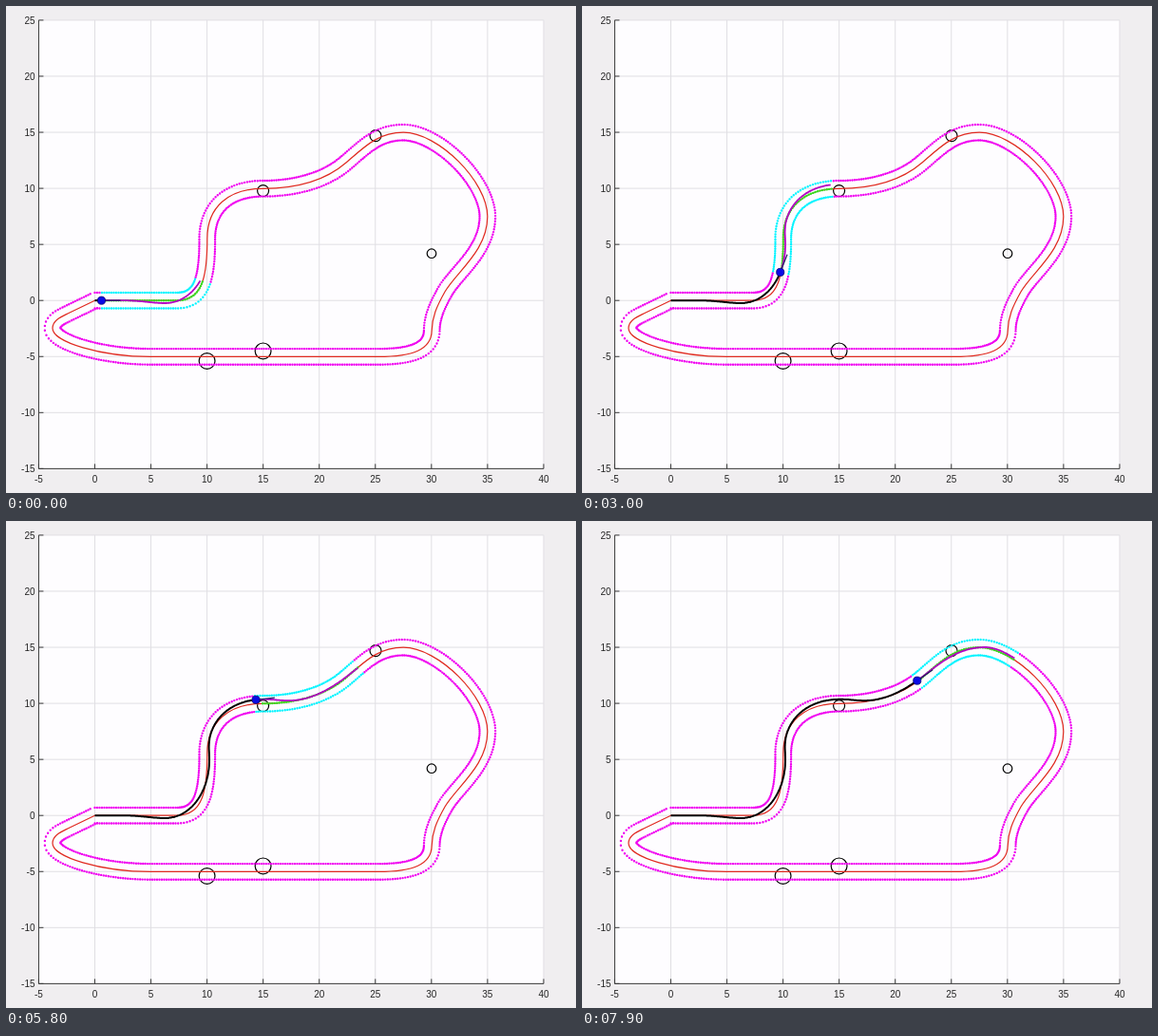
Animation, 600 px wide and 513 px high, one loop 8000 ms. Source, as an HTML page:

```html
<!DOCTYPE html>
<html lang="en">
<head>
<meta charset="utf-8">
<title>Track simulation</title>
<style>
  html, body { margin: 0; width: 100%; height: 100%; overflow: hidden; background: #f0eef0; }
  svg { display: block; width: 600px; height: 513px; }
  text { font: 10px "Liberation Sans", Arial, sans-serif; fill: #262626; }
  path, circle { fill: none; }
  .dots { stroke-linecap: round; stroke-width: 2.4; }
</style>
</head>
<body>
<svg id="plot" viewBox="0 0 600 513"></svg>
<script>
const LOOP = 8000, STEP = 100, SCALE = 11.811, HALF_WIDTH = 8.3;
const plot = document.getElementById('plot');
const px = x => 93.5 + x * SCALE;
const py = y => 310.2 - y * SCALE;

function add(tag, attrs, text) {
  const el = document.createElementNS('http://www.w3.org/2000/svg', tag);
  for (const k in attrs) el.setAttribute(k, attrs[k]);
  if (text !== undefined) el.textContent = text;
  plot.appendChild(el);
  return el;
}
const stroke = (color, width, d = '') =>
  add('path', { d, stroke: color, 'stroke-width': width, 'stroke-linejoin': 'round' });
const dotted = color => add('path', { class: 'dots', stroke: color });

// Axes
const [left, right, top_, bottom] = [px(-5), px(40), py(25), py(-15)];
add('rect', { x: left, y: top_, width: right - left, height: bottom - top_, fill: '#fefdff' });
let grid = '', ticks = `M${left} ${top_}V${bottom}H${right}`;
for (let x = -5; x <= 40; x += 5) {
  grid += `M${px(x)} ${top_}V${bottom}`;
  ticks += `M${px(x)} ${bottom}v-5`;
  add('text', { x: px(x), y: 501.7, 'text-anchor': 'middle' }, x);
}
for (let y = -15; y <= 25; y += 5) {
  grid += `M${left} ${py(y)}H${right}`;
  ticks += `M${left} ${py(y)}h5`;
  add('text', { x: 30.5, y: py(y) + 4, 'text-anchor': 'end' }, y);
}
stroke('#e0dfe3', 1, grid);
stroke('#3a3a3a', 1, ticks);

// Obstacles: x, y, radius
for (const [cx, cy, r] of [[270.6, 194.6, 6], [389, 136.6, 6], [448, 260.7, 4.8],
                           [211.6, 374, 8.4], [270.6, 363.4, 8.4]])
  add('circle', { cx, cy, r, stroke: '#000', 'stroke-width': 1.2 });

const track = stroke('#e02a20', 1.2, `M93.5 310.2H180
  C207 310.2 211.8 285 211.8 245C211.8 212 234 192.3 270.6 192.3
  C304 192.3 336 184 358 165C378 147.7 392 133.2 418.3 133.2
  C455 133.2 506.8 185 506.8 221.7C506.8 258 474 280 462 301
  C453 317 448.5 328 448.2 342C447.8 362 428 369.4 392 369.4
  H152C100 369.4 49 354 49 339.5C49 331 58 327.5 66 323.5L93.5 310.2`);
const route = stroke('none', 0, `M93.5 310.2H125
  C140 310.2 155 313 167 313C196 313 214 283 214 252
  C214 243 213.3 240 213.8 234C214.8 214 232 187.8 272 187.8
  C282 187.8 288 189.2 297 189.2C318 189.2 336 180 353 168
  C371 155.3 392 133 424 133C436 133 446 139 456 145`);

const wall = dotted('#f000f0');
const nearWall = dotted('#00f4ff');
const driven = stroke('#000', 2);
const reference = dotted('#30e420');
const forecast = stroke('#b400c4', 1.8);
const heading = stroke('#20205c', 1.2);
const car = add('circle', { r: 4.1, style: 'fill:#0a0ae6', stroke: '#0a0a70', 'stroke-width': 0.8 });

function sample(path, step) {
  const total = path.getTotalLength(), list = [];
  for (let s = 0; s < total; s += step) {
    const { x, y } = path.getPointAtLength(s);
    const a = path.getPointAtLength(Math.max(0, s - 0.4));
    const b = path.getPointAtLength(Math.min(total, s + 0.4));
    const len = Math.hypot(b.x - a.x, b.y - a.y);
    list.push({ s, x, y, tx: (b.x - a.x) / len, ty: (b.y - a.y) / len });
  }
  return list;
}
const trackPts = sample(track, 2.5);
const routePts = sample(route, 1);

// Distance along a sampled curve of the point nearest to (x, y)
const project = (pts, [x, y]) => pts.reduce((best, p) => {
  const d = Math.hypot(p.x - x, p.y - y);
  return d < best.d ? { d, s: p.s } : best;
}, { d: Infinity, s: 0 }).s;

// Time, car position, end of the look-ahead
const keys = [
  [0, [101, 310], [208, 292]],
  [1200, [148, 311], [212, 243]],
  [3000, [210, 281], [262, 192]],
  [4300, [215, 227], [315, 188]],
  [5000, [230, 203], [342, 177]],
  [6500, [296, 189], [398, 138]],
  [7900, [353, 168], [455, 145]]
].map(([t, at, end]) => ({
  t,
  car: project(routePts, at), carEnd: project(routePts, end),
  ref: project(trackPts, at), refEnd: project(trackPts, end)
}));

function stateAt(t) {
  let i = 0;
  while (i < keys.length - 2 && t >= keys[i + 1].t) i++;
  const a = keys[i], b = keys[i + 1], k = (t - a.t) / (b.t - a.t);
  const mix = name => a[name] + (b[name] - a[name]) * k;
  return { car: mix('car'), carEnd: mix('carEnd'), ref: mix('ref'), refEnd: mix('refEnd') };
}

const dot = (p, off) =>
  `M${(p.x - p.ty * off).toFixed(1)} ${(p.y + p.tx * off).toFixed(1)}h.01`;
const dots = (pts, offsets) => offsets.map(o => pts.map(p => dot(p, o)).join('')).join('');
const line = pts => pts.length ? 'M' + pts.map(p => `${p.x.toFixed(1)} ${p.y.toFixed(1)}`).join('L') : '';

function draw(t) {
  const st = stateAt(t);
  const ahead = p => p.s >= st.ref - 2 && p.s <= st.refEnd;
  const near = trackPts.filter(ahead);
  const sides = [-HALF_WIDTH, HALF_WIDTH];
  wall.setAttribute('d', dots(trackPts.filter(p => !ahead(p)), sides));
  nearWall.setAttribute('d', dots(near, sides));
  reference.setAttribute('d', dots(near.filter(p => p.s > st.ref + 4), [0]));
  driven.setAttribute('d', line(routePts.filter(p => p.s <= st.car)));
  forecast.setAttribute('d', line(routePts.filter(p => p.s >= st.car && p.s <= st.carEnd)));

  const { x, y } = route.getPointAtLength(st.car);
  const p = routePts[Math.round(st.car)];
  heading.setAttribute('d', `M${x} ${y}l${p.tx * 20} ${p.ty * 20}`);
  car.setAttribute('cx', x);
  car.setAttribute('cy', y);
}

let shown = -1;
function tick() {
  const t = Math.floor(performance.now() % LOOP / STEP) * STEP;
  if (t !== shown) draw(shown = t);
  requestAnimationFrame(tick);
}
tick();
</script>
</body>
</html>
```
